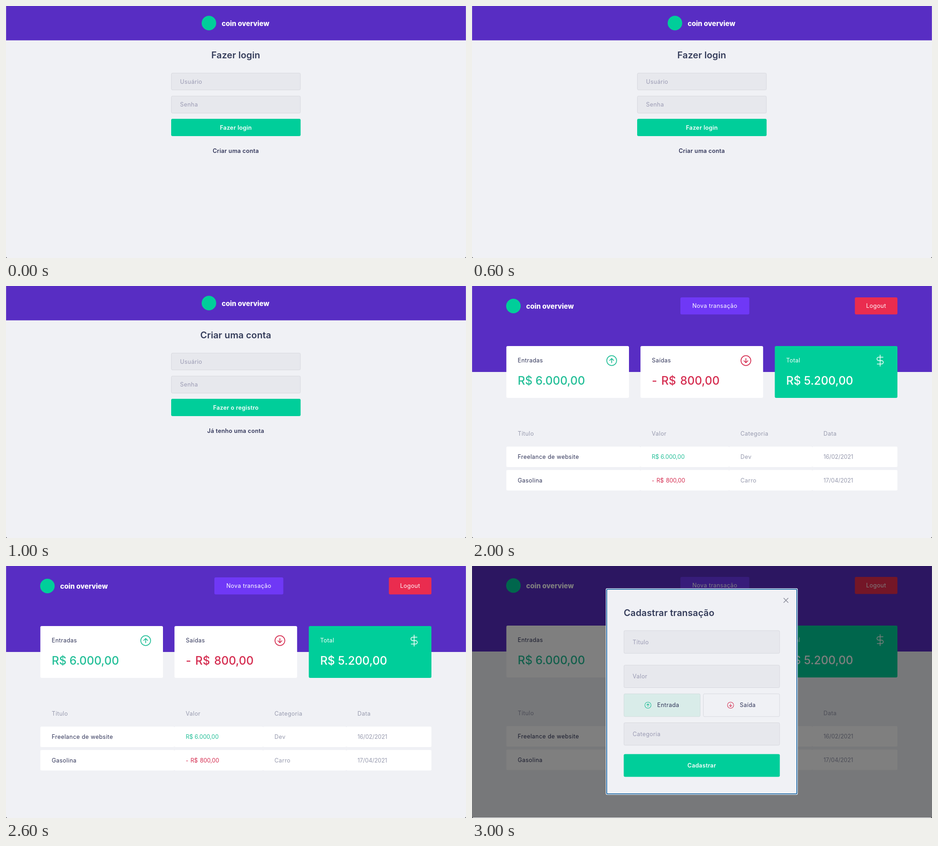
Animation of 1011 by 554 pixels, one loop 4 s. Source, as an HTML page:

```html
<!DOCTYPE html>
<html lang="pt-BR">
<head>
<meta charset="utf-8">
<title>Controle de gastos</title>
<style>
  html, body { margin: 0; height: 100%; overflow: hidden; background: #f0f1f5; }
  svg { display: block; width: 100%; height: 100%; }
  text { font: 400 12.6px Inter, "Noto Sans", sans-serif; letter-spacing: .032em; fill: #32365a; }
  .brand { font-weight: 800; font-size: 15.1px; letter-spacing: 0; fill: #fff; }
  .title { font-weight: 600; font-size: 20px; letter-spacing: .006em; fill: #333b59; }
  .bold { font-weight: 600; letter-spacing: .025em; }
  .big { font-weight: 500; font-size: 25px; letter-spacing: 0; }
  .num { letter-spacing: -.006em; }
  .mid { text-anchor: middle; }
  .white { fill: #fff; }
  .grey { fill: #979aae; }
  .hint { fill: #9a9ab3; }
  .in { fill: #24bf98; }
  .out { fill: #d52d50; word-spacing: .1em; }
  .icon { fill: none; stroke-linecap: round; stroke-linejoin: round; }
</style>
</head>
<body>
<svg id="stage" viewBox="0 0 1011 554" preserveAspectRatio="none"></svg>
<script>
const PURPLE = '#582dc3', GREEN = '#00ce9a', RED = '#ea2c4f', PAGE = '#f0f1f5';
const INCOME = '#24bf98', EXPENSE = '#d52d50';

const rect = (x, y, w, h, fill, r = 0, stroke = 'none') =>
  `<rect x="${x}" y="${y}" width="${w}" height="${h}" rx="${r}" fill="${fill}" stroke="${stroke}"/>`;
const text = (x, y, str, cls = '') => `<text x="${x}" y="${y}" class="${cls}">${str}</text>`;
const icon = (x, y, scale, color, width, path) =>
  `<path class="icon" transform="translate(${x} ${y}) scale(${scale})" stroke="${color}" stroke-width="${width}" d="${path}"/>`;

const RING = 'M-10 0a10 10 0 1 0 20 0a10 10 0 1 0-20 0';
const up = (x, y, s) => icon(x, y, s, INCOME, 1.6, RING + 'M0 4.4V-4.4M-4-.4L0-4.4L4-.4');
const down = (x, y, s) => icon(x, y, s, EXPENSE, 1.6, RING + 'M0-4.4V4.4M-4 .4L0 4.4L4 .4');
const dollar = (x, y) => icon(x, y, 1.16, '#fff', 1.3,
  'M0-10.5V10.5M5.5-6.5H-2.7a3.25 3.25 0 0 0 0 6.5h5.4a3.25 3.25 0 0 1 0 6.5H-5.5');

const header = height =>
  rect(0, 0, 1011, height, PURPLE) +
  [0, 1010].map(x => rect(x, 0, 1, height, 'rgba(255,255,255,.25)')).join('');
const brand = (x, y) =>
  `<circle cx="${x}" cy="${y}" r="16" fill="${GREEN}"/>` + text(x + 28, y + 6.3, 'coin overview', 'brand');

const field = (x, y, w, h, label) =>
  rect(x + .5, y + .5, w - 1, h - 1, '#e7e8ed', 2.5, '#d7d8de') + text(x + 19.5, y + h / 2 + 4.5, label, 'hint');
const button = (x, y, w, h, label, fill, cls = 'bold') =>
  rect(x, y, w, h, fill, 3) + text(x + w / 2, y + h / 2 + 4.6, label, cls + ' mid white');

const form = (title, action, link) =>
  header(75.5) + brand(446, 37.5) +
  text(505, 115, title, 'title mid') +
  field(363, 147, 284.5, 38, 'Usuário') +
  field(363, 197.5, 284.5, 38.5, 'Senha') +
  button(363, 248, 284.5, 38, action, GREEN) +
  text(505, 322.5, link, 'bold mid');

const card = (x, label, value, cls, fill, labelCls = '') =>
  rect(x, 132, 269.5, 114, fill, 3) +
  text(x + 25, 168.3, label, labelCls) + text(x + 25, 216.8, value, 'big ' + cls);

const row = (y, title, value, cls, category, date) =>
  [[75.5, 294.5], [370, 195], [565, 183], [748, 187]].map(([x, w]) => rect(x, y, w, 45, '#fff', 2.5)).join('') +
  text(100.5, y + 27, title) + text(395, y + 27, value, 'num ' + cls) +
  text(590, y + 27, category, 'grey') + text(772.5, y + 27, date, 'num grey');

const dashboard =
  header(189) + brand(91, 44) +
  button(458, 25, 151.5, 37.5, 'Nova transação', '#6f38f6', '') +
  button(841.5, 25, 93.5, 37.5, 'Logout', RED, '') +
  card(75.5, 'Entradas', 'R$ 6.000,00', 'in', '#fff') + up(307, 164, 1.08) +
  card(370.3, 'Saídas', '- R$ 800,00', 'out', '#fff') + down(602, 164, 1.08) +
  card(665.5, 'Total', 'R$ 5.200,00', 'white', GREEN, 'white') + dollar(897, 164) +
  [[100.5, 'Título'], [395, 'Valor'], [590, 'Categoria'], [772.5, 'Data']]
    .map(([x, label]) => text(x, 329, label, 'grey')).join('') +
  row(353, 'Freelance de website', 'R$ 6.000,00', 'in', 'Dev', '16/02/2021') +
  row(404.5, 'Gasolina', '- R$ 800,00', 'out', 'Carro', '17/04/2021');

const modal =
  `<g transform="translate(0 -1)">${dashboard}</g>` +
  rect(0, 0, 1011, 553, 'rgba(0,0,0,.5)') +
  rect(294, 49, 422, 454, '#f4f8fc', 3) +
  rect(295.2, 50.2, 419.6, 451.6, '#15609f', 2) +
  rect(297, 52, 416, 448, PAGE, 1) +
  icon(690, 75.5, 1, '#8d8f9c', 1.6, 'M-4.7-4.7L4.7 4.7M4.7-4.7L-4.7 4.7') +
  text(333.5, 109.7, 'Cadastrar transação', 'title') +
  field(333.5, 141.5, 343, 51, 'Título') +
  field(333.5, 217.5, 343, 50.5, 'Valor') +
  rect(334, 281, 167.5, 50, '#d9ece9', 2.5, '#d0dcdd') + up(386.7, 306, .68) + text(407, 310.3, 'Entrada') +
  rect(508.5, 281, 167.5, 50, PAGE, 2.5, '#d7d8de') + down(568.3, 306, .68) + text(588.5, 310.3, 'Saída') +
  field(333.5, 344, 343, 50.5, 'Categoria') +
  button(333.5, 413.5, 343, 50, 'Cadastrar', GREEN);

const screens = [
  form('Fazer login', 'Fazer login', 'Criar uma conta'),
  form('Criar uma conta', 'Fazer o registro', 'Já tenho uma conta'),
  dashboard,
  modal
];
const corners = '<path d="M0 550.5Q0 554 3.5 554H0zM1011 550.5Q1011 554 1007.5 554H1011z" fill="#111"/>';

const stage = document.getElementById('stage');
stage.innerHTML = rect(0, 0, 1011, 554, PAGE) + screens.map(s => `<g>${s}</g>`).join('') + corners;
const groups = stage.querySelectorAll(':scope > g');

function draw() {
  const current = Math.floor(performance.now() / 1000) % screens.length;
  groups.forEach((g, i) => g.style.display = i === current ? '' : 'none');
  requestAnimationFrame(draw);
}
draw();
</script>
</body>
</html>
```
